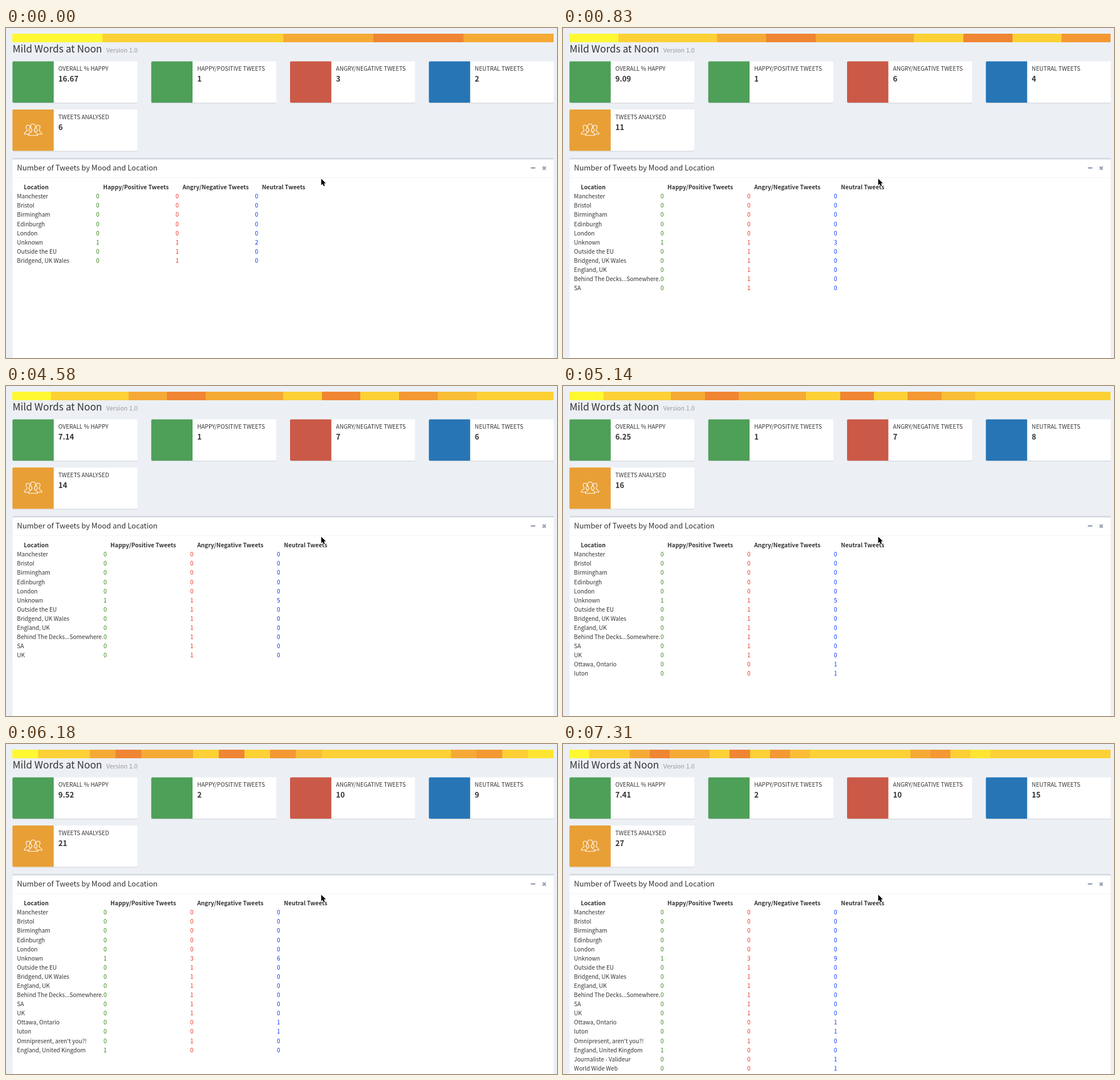
Animation of 966x579 px, one loop 8 s. Source, as an HTML page with a canvas:

```html
<!DOCTYPE html>
<html lang="en">
<head>
<meta charset="utf-8">
<title>Mood dashboard</title>
<style>
html, body { margin: 0; width: 100%; height: 100%; overflow: hidden; background: #ecf0f5; }
canvas { display: block; width: 966px; height: 579px; }
</style>
</head>
<body>
<canvas id="stage" width="966" height="579"></canvas>
<script>
const ctx = document.getElementById('stage').getContext('2d');
const LOOP = 8000;
const FAMILY = '"Noto Sans CJK JP", "Noto Sans CJK SC", "Open Sans", sans-serif';
const INK = '#333';

// Bar colour per score, from happy to angry
const SHADES = {
  B: '#fff833', G: '#fee531', Y: '#fdd135', N: '#fdcf35',
  F: '#f9be35', O: '#f6aa36', E: '#f39833', D: '#f08533'
};
const MOODS = ['happy', 'angry', 'neutral'];
const MOOD_INK = { happy: '#2b8308', angry: '#ee2a1e', neutral: '#0433ff' };
const CITIES = ['Manchester', 'Bristol', 'Birmingham', 'Edinburgh', 'London'];
const WIDE_ROW = 'Behind The Decks...Somewhere.';

// [arrival ms, shade, mood, place]
const FEED = [
  [0, 'B', 'happy', 'Unknown'],
  [0, 'Y', 'neutral', 'Unknown'],
  [0, 'Y', 'neutral', 'Unknown'],
  [0, 'O', 'angry', 'Unknown'],
  [0, 'D', 'angry', 'Outside the EU'],
  [0, 'O', 'angry', 'Bridgend, UK Wales'],
  [90, 'O', 'angry', 'England, UK'],
  [270, 'Y', 'neutral', 'Unknown'],
  [350, 'D', 'angry', WIDE_ROW],
  [830, 'Y', 'neutral', ''],
  [830, 'E', 'angry', 'SA'],
  [1640, 'F', 'angry', 'UK'],
  [2030, 'Y', 'neutral', 'Unknown'],
  [4580, 'Y', 'neutral', 'Unknown'],
  [4700, 'Y', 'neutral', 'Ottawa, Ontario'],
  [5140, 'Y', 'neutral', 'luton'],
  [5440, 'Y', 'neutral', 'Unknown'],
  [5440, 'O', 'angry', "Omnipresent, aren't you?!"],
  [5920, 'E', 'angry', 'Unknown'],
  [6070, 'N', 'angry', 'Unknown'],
  [6070, 'G', 'happy', 'England, United Kingdom'],
  [6190, 'Y', 'neutral', 'Journaliste - Valideur'],
  [6300, 'Y', 'neutral', 'World Wide Web'],
  [6710, 'Y', 'neutral', ''],
  [6860, 'Y', 'neutral', 'Unknown'],
  [6950, 'Y', 'neutral', 'Unknown'],
  [7310, 'Y', 'neutral', 'Unknown']
];

// Normalise sizes by digit width, like font-size-adjust: ch-width
function digitScale(weight, ratio) {
  ctx.font = `${weight} 100px ${FAMILY}`;
  return ratio * 100 / ctx.measureText('0').width;
}
const SCALE = {
  300: digitScale(300, 0.497),
  400: digitScale(400, 0.497),
  700: digitScale(700, 0.536)
};

function text(str, x, y, size = 11.27, weight = 400, color = INK) {
  ctx.font = `${weight} ${size * SCALE[weight]}px ${FAMILY}`;
  ctx.fillStyle = color;
  ctx.fillText(str, x, y);
}

function rect(x, y, w, h, color, radii = 0) {
  ctx.fillStyle = color;
  ctx.beginPath();
  ctx.roundRect(x, y, w, h, radii);
  ctx.fill();
}

function drawBar(tweets) {
  const left = 11.2, width = 949.2, n = tweets.length;
  const edge = i => Math.round(left + width * i / n);
  tweets.forEach(([, shade], i) => {
    rect(edge(i), 10, edge(i + 1) - edge(i), 15, SHADES[shade]);
  });
}

function drawCard(col, row, color, label, value) {
  const x = 11.3 + col * 243.35, y = 58.6 + row * 84.5;
  rect(x, y + 1, 219.3, 72.6, 'rgba(0,0,0,.1)', 2);
  rect(x, y, 219.3, 72.3, '#fff', 2);
  rect(x, y, 72.4, 72.3, color, [2, 0, 0, 2]);
  text(label, x + 80.5, y + 16.5);
  text(String(value), x + 80.5, y + 35.8, 14.5, 700);
}

function drawPerson(x, top, bottom, s) {
  ctx.beginPath();
  ctx.moveTo(x - 2 * s, top + 11 * s);
  ctx.bezierCurveTo(x - 6.2 * s, top + 6 * s, x - 5 * s, top, x, top);
  ctx.bezierCurveTo(x + 5 * s, top, x + 6.2 * s, top + 6 * s, x + 2 * s, top + 11 * s);
  ctx.bezierCurveTo(x + 1.5 * s, top + 16 * s, x + 8.5 * s, bottom - 5, x + 8.7 * s, bottom);
  ctx.lineTo(x - 8.7 * s, bottom);
  ctx.bezierCurveTo(x - 8.5 * s, bottom - 5, x - 1.5 * s, top + 16 * s, x - 2 * s, top + 11 * s);
  ctx.closePath();
  ctx.fill();
  ctx.stroke();
}

function drawPeople() {
  ctx.strokeStyle = '#fff';
  ctx.fillStyle = '#e89f36';
  ctx.lineWidth = 1.1;
  drawPerson(38.6, 170.5, 186.2, 0.75);
  drawPerson(56.4, 170.5, 186.2, 0.75);
  drawPerson(47.5, 168.3, 188.2, 0.95);
}

function drawPanel() {
  rect(11.3, 228, 949.2, 360, '#d2d6de', 2);
  rect(11.3, 230.4, 949.2, 360, '#fff');
  rect(11.3, 262, 949.2, 1, '#f4f4f4');
  text('Number of Tweets by Mood and Location', 19.3, 250.2, 14.5);
  rect(920, 244.3, 8.2, 2.5, '#97a0b3', 0.8);
  ctx.strokeStyle = '#97a0b3';
  ctx.lineWidth = 2.3;
  ctx.beginPath();
  ctx.moveTo(940.9, 243.1);
  ctx.lineTo(946.3, 248.7);
  ctx.moveTo(946.3, 243.1);
  ctx.lineTo(940.9, 248.7);
  ctx.stroke();
}

function drawTable(rows) {
  const wide = rows.has(WIDE_ROW);
  const first = wide ? 170.9 : 158.1, step = wide ? 152.1 : 139.2;
  const heads = ['Happy/Positive Tweets', 'Angry/Negative Tweets', 'Neutral Tweets'];
  text('Location', 31.2, 283.3, 11.27, 700);
  heads.forEach((h, i) => text(h, first + step * i + 12.2, 283.3, 11.27, 700));
  let y = 299.3;
  for (const [place, counts] of rows) {
    text(place, 19.3, y);
    MOODS.forEach((m, i) => text(String(counts[m]), first + step * i, y, 11.27, 400, MOOD_INK[m]));
    y += 16.09;
  }
}

function drawCursor() {
  const shape = [[0, 0], [0, 11.4], [2.6, 9], [4.4, 13], [6.4, 12.1], [4.7, 8.2], [8.2, 8.1]];
  ctx.beginPath();
  shape.forEach(([x, y]) => ctx.lineTo(552.6 + x, 264.4 + y));
  ctx.closePath();
  ctx.lineJoin = 'round';
  ctx.lineWidth = 1.8;
  ctx.strokeStyle = '#fff';
  ctx.stroke();
  ctx.fillStyle = '#000';
  ctx.fill();
}

const tally = () => ({ happy: 0, angry: 0, neutral: 0 });

function draw(t) {
  const tweets = FEED.filter(([at]) => at <= t);
  const total = tally();
  const rows = new Map(CITIES.map(c => [c, tally()]));
  for (const [, , mood, place] of tweets) {
    total[mood]++;
    if (!place) continue;
    if (!rows.has(place)) rows.set(place, tally());
    rows.get(place)[mood]++;
  }

  rect(0, 0, 966, 579, '#ecf0f5');
  drawBar(tweets);
  text('Mild Words at Noon', 11.6, 43, 19.3);
  text('Version 1.0', 175.8, 43, 12.1, 300, '#999');
  drawCard(0, 0, '#4e9f58', 'OVERALL % HAPPY', (total.happy / tweets.length * 100).toFixed(2));
  drawCard(1, 0, '#4e9f58', 'HAPPY/POSITIVE TWEETS', total.happy);
  drawCard(2, 0, '#cb5947', 'ANGRY/NEGATIVE TWEETS', total.angry);
  drawCard(3, 0, '#2775b5', 'NEUTRAL TWEETS', total.neutral);
  drawCard(0, 1, '#e89f36', 'TWEETS ANALYSED', tweets.length);
  drawPeople();
  drawPanel();
  drawTable(rows);
  drawCursor();
}

const start = performance.now();
function tick() {
  draw((performance.now() - start) % LOOP);
  requestAnimationFrame(tick);
}
tick();
</script>
</body>
</html>
```
